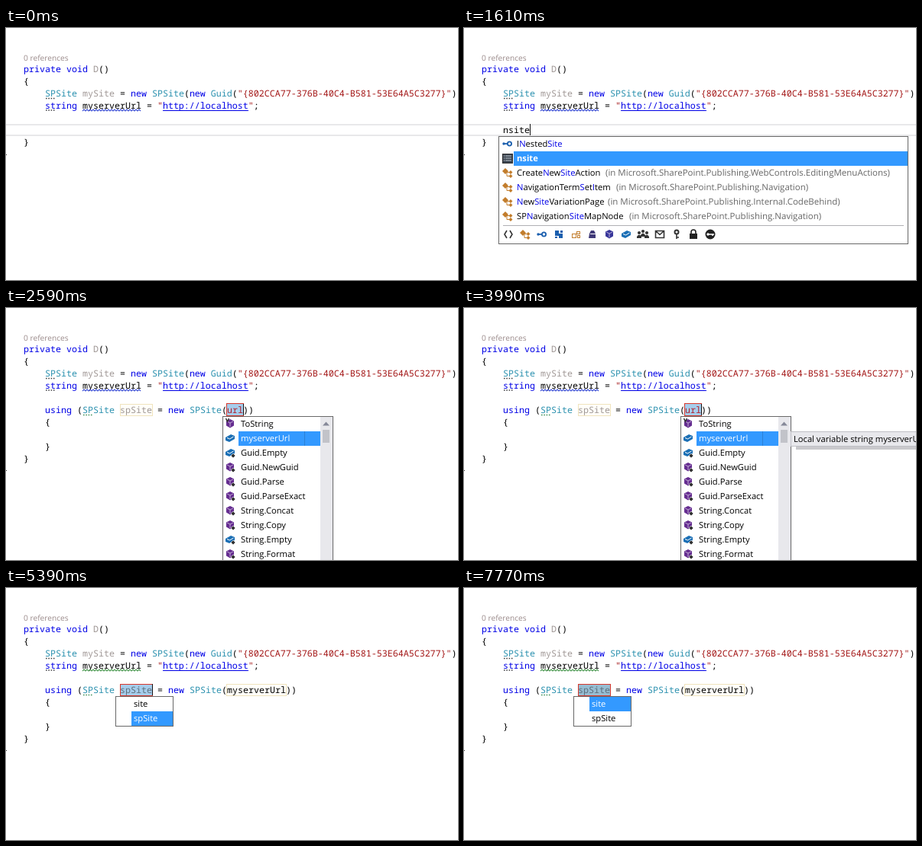
An HTML page for the animation above (8000 ms loop, 591 by 331 pixels).

```html
<!DOCTYPE html>
<html lang="en">
<head>
<meta charset="utf-8">
<title>Code template</title>
<style>
html, body { margin: 0; width: 100%; height: 100%; overflow: hidden; background: #fff; }
svg { display: block; width: 591px; height: 331px; }
text { white-space: pre; text-rendering: geometricPrecision; font: 11.2px "Open Sans", "Noto Sans", sans-serif; fill: #000; }
.code { font: 11.6667px "Noto Sans Mono", monospace; }
.lens { font-size: 10.2px; fill: #9a8a8a; }
.kw, .hit { fill: #0000e6; }
.type { fill: #2b91af; }
.str { fill: #a31515; }
.dim { fill: #a09896; }
.bad { fill: #b0202c; }
.picked { fill: #5d6f7c; }
.note { fill: #666; font-size: 11.5px; }
.inv { fill: #fff; }
.bold { font-weight: bold; }
</style>
</head>
<body>
<svg id="stage" viewBox="0 0 591 331"></svg>
<script>
const LOOP = 8000, ROW = 19;
const stage = document.getElementById('stage');
const layers = [];

// Adds a group visible during the [from, to] pairs in spans; always if none.
function layer(markup, ...spans) {
  const g = document.createElementNS('http://www.w3.org/2000/svg', 'g');
  g.innerHTML = markup;
  stage.append(g);
  if (spans.length) layers.push({ g, spans });
}

const rect = (x, y, w, h, fill) => `<rect x="${x}" y="${y}" width="${w}" height="${h}" fill="${fill}"/>`;
const frame = (x, y, w, h, stroke, fill = 'none') =>
  `<rect x="${x + .5}" y="${y + .5}" width="${w - 1}" height="${h - 1}" fill="${fill}" stroke="${stroke}"/>`;
const path = (d, fill, extra = '') => `<path d="${d}" fill="${fill}" ${extra}/>`;
const label = (x, y, content, cls = '') => `<text x="${x}" y="${y}" class="${cls}">${content}</text>`;

// Words may be prefixed with a class, as in "kw:using".
const code = (x, y, ...parts) => label(x, y, parts.map(part => {
  const m = /^(kw|type|str|dim|bad|picked):(.*)$/.exec(part);
  return m ? `<tspan class="${m[1]}">${m[2]}</tspan>` : part;
}).join(''), 'code');

const dots = (x, y, color) => path(`M${x} ${y}h12`, 'none', `stroke="${color}" stroke-width="1.4" stroke-dasharray="1.6 1.7"`);
const wave = (x, y, w, color) =>
  path(`M${x} ${y}` + 'l2 -2l2 2'.repeat(w / 4), 'none', `stroke="${color}" stroke-width="1.1"`);

const icons = {
  face: (x, y) => `<g stroke="#1b5fae" fill="none" stroke-width="1.8"><circle cx="${x + 2.5}" cy="${y}" r="2.6"/>` +
    `<path d="M${x - 5} ${y}h5"/><circle cx="${x - 5}" cy="${y}" r=".8"/></g>`,
  snip: (x, y) => frame(x - 7, y - 6, 14, 13, '#333', '#3a4450') +
    path(`M${x - 3} ${y - 3}h8m-8 3h8m-8 3h8`, 'none', 'stroke="#c4ccd4"') +
    path(`M${x - 5} ${y - 3}h1m-1 3h1m-1 3h1`, 'none', 'stroke="#fff"'),
  cls: (x, y) => path(`M${x - 3} ${y - 6}l4 4l-4 4l-4 -4zM${x + 4} ${y - 3}l2.5 2.5l-2.5 2.5l-2.5 -2.5zM${x + 4} ${y + 2}l2.5 2.5l-2.5 2.5l-2.5 -2.5z`, '#c27d2c') +
    path(`M${x - 2} ${y - .5}h6m-5 0v5h4`, 'none', 'stroke="#c27d2c"'),
  cube: (x, y) => path(`M${x} ${y - 6}l5 2.5v6l-5 3l-5 -3v-6z`, '#652d90') +
    path(`M${x - 4} ${y - 3}l4 2l4 -2M${x} ${y - 1}v5`, 'none', 'stroke="#d9c9e6" stroke-width=".8"'),
  brick: (x, y) => path(`M${x - 6} ${y - 1}l7 -4l5 2v4l-7 4l-5 -2z`, '#1b6fb5') +
    path(`M${x - 4} ${y - .5}l3.5 1.5l5 -3`, 'none', 'stroke="#fff" stroke-width="1"')
};
const badge = (x, y) => path(`M${x + 4} ${y + 1}l3 3l-3 3l-3 -3z`, '#333', 'stroke="#fff" stroke-width=".6"');

// Letters in [brackets] are the matched ones.
const hits = s => s.replace(/\[(\w+)\]/g, '<tspan class="hit">$1</tspan>');

function list(items, selected, right) {
  return items.map(([icon, name, noteX, note], i) => {
    const y = 152 + i * ROW, on = i === selected;
    return (on ? rect(65, y - 9, right - 65, ROW, '#3399ff') : '') + icons[icon](57, y) +
      label(69, y + 4, hits(name), on ? 'inv bold' : '') +
      (note ? label(noteX, y + 4, `(in ${note})`, 'note') : '');
  }).join('');
}

const arrowUp = (x, y, color) => path(`M${x - 4.5} ${y + 2.5}l4.5 -5l4.5 5z`, color);

// Fixed code
layer(rect(0, 0, 591, 331, '#fff') +
  label(23, 43, '0 references', 'lens') +
  code(23, 58, 'kw:private', ' ', 'kw:void', ' ', 'dim:D', '()') +
  code(23, 74, '{') +
  code(51, 90, 'type:SPSite', ' ', 'dim:mySite', ' = ', 'kw:new', ' ', 'type:SPSite', '(', 'kw:new', ' ', 'type:Guid',
    '(', 'str:"{802CCA77-376B-40C4-B581-53E64A5C3277}"', ')') +
  code(51, 106, 'kw:string', ' myserverUrl = ', 'str:"', 'kw:http://localhost', 'str:"', ';') +
  rect(205, 108, 112, 1, '#0000e6') +
  dots(52, 92.5, '#444') + dots(52, 108, '#444'));
layer(wave(100, 109, 76, '#3c4fd8'), [0, 4340]);
layer(wave(100, 109, 76, '#4a9a50'), [4340, LOOP]);

// The current line is outlined while nothing is selected
layer(rect(0, 126, 591, 2, '#e8e8ea') + rect(0, 140, 591, 2, '#e8e8ea'), [0, 1960], [4270, 5180]);
layer(code(23, 154, '}') + rect(0, 166, 1, 1, '#333'), [0, 1960]);

// Typing
const typed = [[210, 'n'], [420, 'ns'], [630, 'nsi'], [700, 'nsit'], [840, 'nsite'], [1960]];
typed.slice(0, -1).forEach(([from, word], i) => layer(code(51, 138, word), [from, typed[i + 1][0]]));

const sql = 'System.Data.SqlTypes';
const editing = 'Microsoft.SharePoint.Publishing.WebControls.EditingMenuActions';
layer(frame(45, 142, 560, 200, '#686868', '#fff') + rect(578, 143, 13, 188, '#ececef') + arrowUp(586.5, 152, '#ddd0c8') +
  list([
    ['face', 'I[N]ested[Si]te'],
    ['face', 'ITypeLibExporter[N]otify[Si]nk'],
    ['face', 'ITypeLibImporter[N]otify[Si]nk'],
    ['snip', 'nsite'],
    ['cls', 'Strong[N]ame[Si]gnatureInformation', 252, 'System.Security.Cryptography'],
    ['cls', 'Type[N]Char[S]chema[I]mporterExtension', 268, sql],
    ['cls', 'Type[N]Text[S]chema[I]mporterExtension', 268, sql],
    ['cls', 'Type[N]VarChar[S]chema[I]mporterExtension', 288, sql],
    ['cls', 'Type[N]umeric[S]chema[I]mporterExtension', 282, sql],
    ['cls', 'Create[N]ew[Si]teAction', 185, editing]
  ], 3, 578), [280, 910]);

const stroked = (d, color = '#333') => path(d, 'none', `stroke="${color}" stroke-width="1.6"`);
const toolbar = rect(51, 259, 524, 1, '#b0b0b4') +
  stroked('M56 266l-3 5l3 5M60 266l3 5l-3 5') +
  icons.cls(80, 271) + icons.face(102, 271) +
  path('M119 266h5v4h5v6h-5v-3h-5z', '#1b5fae') + rect(126, 266, 3, 3, '#1b5fae') + rect(119, 274, 3, 2, '#1b5fae') +
  frame(141, 270, 6, 6, '#c27d2c') + frame(147, 267, 5, 4, '#c27d2c') + frame(148, 272, 4, 4, '#c27d2c') +
  path('M164 270l2 -4h4l2 4v6h-9z', '#403a78') + rect(165, 270, 7, 1, '#fff') +
  icons.cube(190, 271).replace('#652d90', '#37369a') + icons.brick(212, 271) +
  [[229, 269], [239, 269], [234, 267]].map(([x, y]) =>
    `<circle cx="${x}" cy="${y}" r="2.1" fill="#333"/>` + path(`M${x - 3} ${y + 7}v-2q3 -5 6 0v2z`, '#333')).join('') +
  stroked('M250.5 266.5h11v9h-11zl5.5 5l5.5 -5') +
  '<circle cx="278" cy="268" r="2.5" fill="none" stroke="#333" stroke-width="2"/>' + stroked('M278 270v7M278 275h3') +
  rect(295, 270, 10, 7, '#222') + stroked('M297 270v-2a3 3 0 0 1 6 0v2', '#222') +
  '<circle cx="322" cy="271" r="6.5" fill="#222"/>' + stroked('M319 271h8m-2 0v2', '#fff') +
  '<circle cx="319" cy="271" r="1.7" fill="#fff"/>';

layer(frame(45, 142, 536, 142, '#686868', '#fff') + list([
    ['face', 'I[N]ested[Site]'],
    ['snip', 'nsite'],
    ['cls', 'Create[N]ew[Site]Action', 185, editing],
    ['cls', '[N]avigationTerm[S]et[I]tem', 199, 'Microsoft.SharePoint.Publishing.Navigation'],
    ['cls', '[N]ew[Site]VariationPage', 188, 'Microsoft.SharePoint.Publishing.Internal.CodeBehind'],
    ['cls', 'SP[N]avigation[Site]MapNode', 216, 'Microsoft.SharePoint.Publishing.Navigation']
  ], 1, 580) + toolbar, [910, 1890]);

// Expanded template
const pale = '#f0e3bd', red = '#d8382c';
layer(frame(149, 126, 43, 16, pale, '#fffef9'), [2100, 5180]);
layer(frame(288, 125, 23, 17, red, '#a6cdec'), [2100, 4270]);
layer(frame(288, 125, 79, 17, red), [4270, 5180]);
layer(frame(288, 126, 79, 16, pale, '#fffef9'), [5180, LOOP]);
layer(frame(149, 126, 43, 16, red, '#a6cdec'), [5180, 6160]);
layer(frame(149, 126, 43, 16, red, '#97bdd2'), [6160, LOOP]);
layer(code(51, 138, 'kw:using', ' (', 'type:SPSite') + dots(101, 140.5, '#3f8f58') +
  code(191, 138, ' = ', 'kw:new', ' ', 'type:SPSite', '(') +
  code(51, 154, '{') + code(51, 186, '}') + code(23, 202, '}') + rect(0, 213, 1, 1, '#333'), [1960, LOOP]);
layer(code(149, 138, 'dim:spSite'), [1960, 5180]);
layer(code(149, 138, 'picked:spSite'), [5180, LOOP]);
layer(code(289, 138, 'bad:url', '))'), [1960, 4270]);
layer(code(289, 138, 'myserverUrl))'), [4270, LOOP]);

// Argument suggestions
const members = ['ToString', 'myserverUrl', 'Guid.Empty', 'Guid.NewGuid', 'Guid.Parse', 'Guid.ParseExact',
  'String.Concat', 'String.Copy', 'String.Empty', 'String.Format'];
layer(frame(283, 142, 145, 200, '#686868', '#fff') +
  rect(411, 143, 16, 188, '#e8e8ec') + arrowUp(418.5, 152, '#868999') + rect(414, 160, 9, 17, '#c2c3c9') +
  members.map((name, i) => {
    const y = 152 + i * ROW, on = i === 1;
    const icon = on || name.endsWith('Empty') ? 'brick' : 'cube';
    return (on ? rect(304, 162, 107, ROW, '#3399ff') + rect(390, 162, 1, ROW, '#2b80d6') : '') +
      icons[icon](293, y) + (i > 1 ? badge(293, y) : '') +
      label(307, y + 4, name, on ? 'inv' : '');
  }).join('') + stroked('M287.5 145l2 4l2 -4'), [2380, 4270]);
layer(rect(434, 182, 157, 4, '#c9c9cc') + frame(427, 162, 180, 20, '#bfc0c6', '#e8e8ec') +
  label(431, 176, 'Local variable string myserverUrl'), [2800, 4270]);

// Name suggestions
function names(selected, ...spans) {
  layer(frame(143, 142, 76, 40, '#686868', '#fff') + rect(164, 143 + selected * ROW, 54, ROW, '#3399ff') +
    ['site', 'spSite'].map((name, i) =>
      label(167, 156 + i * ROW, name, i === selected ? 'inv' : '')).join(''), ...spans);
}
names(1, [5390, 6160], [6510, 6790], [7140, 7420]);
names(0, [6160, 6510], [6790, 7140], [7420, LOOP]);

const caret = (x, ...spans) => layer(rect(x, 126, 1, 15, '#111'), ...spans);
caret(51, [140, 210]);
caret(58, [210, 420]);
caret(65, [420, 630]);
caret(72, [630, 700]);
caret(79, [700, 840]);
caret(86, [840, 1120], [1610, 1960]);
caret(310, [2100, 3010], [3290, 3500], [3990, 4270]);
caret(366, [4270, 4900]);
caret(191, [5180, 5670], [5880, 6370], [6510, 7770]);

function draw(now) {
  const t = now % LOOP;
  for (const { g, spans } of layers)
    g.style.display = spans.some(([from, to]) => t >= from && t < to) ? '' : 'none';
  requestAnimationFrame(draw);
}
draw(performance.now());
</script>
</body>
</html>
```
